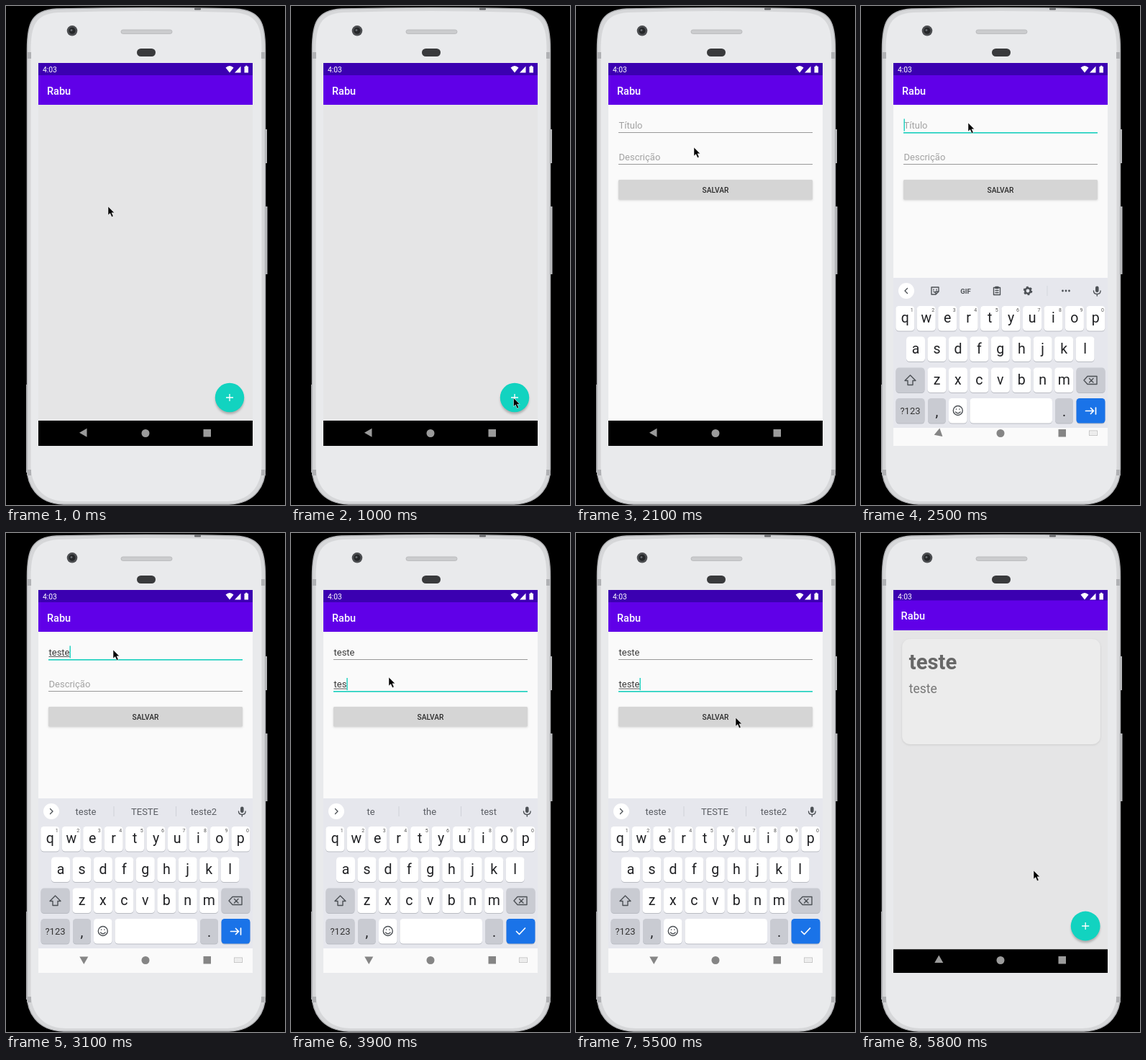
Recreate the animation shown at these times as an HTML page. Size 388 by 692 pixels, loop 5.9 s.

```html
<!DOCTYPE html>
<html lang="pt">
<head>
<meta charset="utf-8">
<title>Notas</title>
<style>
html, body { margin: 0; width: 100%; height: 100%; overflow: hidden; background: #000; }
svg { display: block; width: 388px; height: 692px; }
text { font-family: Roboto, "Liberation Sans", sans-serif; }
.mid { text-anchor: middle; }
.bar { font-size: 14.5px; font-weight: 500; fill: #fff; }
.field { font-size: 13px; fill: #3a3a3a; }
.hint { font-size: 13px; fill: #a2a2a2; }
.key { font-size: 19.5px; fill: #202124; text-anchor: middle; }
.line { fill: none; stroke: #4d5156; stroke-width: 1.4; stroke-linejoin: round; stroke-linecap: round; }
</style>
</head>
<body>
<svg viewBox="0 0 388 692">
  <defs>
    <filter id="soft" x="-30%" y="-30%" width="160%" height="160%"><feGaussianBlur stdDeviation="1.8"/></filter>
    <clipPath id="glass"><rect x="45" y="79" width="298" height="531"/></clipPath>
  </defs>
  <rect width="388" height="692"/>

  <!-- phone -->
  <path d="M361 171h2v47h-2zM361 278h2.500v94h-2.500z" fill="#b9babd"/>
  <path d="M28 525h3v122h-3z" fill="#b4b5b8"/>
  <path d="M29.500 60C29.500 23 36 6 70 4Q195 1 319 4C354 6 360.500 23 360.500 60V642C360.500 662 349 690 310 691H80C41 690 29.500 662 29.500 642Z"
    fill="#d6d7d9" stroke="#b3b4b7" stroke-width="1.500"/>
  <path d="M34.500 62C34.500 27 41 11 72 9Q195 5 317 9C349 11 355.500 27 355.500 62V638C355.500 658 345 686 308 687H82C45 686 34.500 658 34.500 638Z"
    fill="#e9eaec"/>
  <path d="M29 64h6v9h-6zM355 64h6v9h-6zM29 643h6v8h-6zM355 643h6v8h-6z" fill="#b0b1b4"/>
  <rect x="262" y="2.500" width="9" height="3" rx="1" fill="#66676a"/>
  <circle cx="92" cy="34.300" r="7.300" fill="#4c4e51"/>
  <circle cx="92" cy="34.300" r="4.500" fill="#252729"/>
  <circle cx="91" cy="33.500" r="1.500" fill="#64686d"/>
  <rect x="160" y="33" width="71" height="5.500" rx="2.700" fill="#cbccce" stroke="#b0b1b3" stroke-width=".7"/>
  <rect x="182" y="59" width="26" height="11" rx="5.500" fill="#393a3c"/>

  <g clip-path="url(#glass)">
    <rect x="45" y="79" width="298" height="531"/>
    <g id="list">
      <rect x="45" y="79" width="298" height="500" fill="#e5e5e6"/>
      <g id="card">
        <rect x="58.500" y="150" width="273" height="144.500" rx="11" fill="#bbb" opacity=".6" filter="url(#soft)"/>
        <rect x="58.500" y="149" width="273" height="144.500" rx="11" fill="#ececec"/>
        <text x="68" y="190.500" font-size="29" font-weight="700" fill="#686868">teste</text>
        <text x="68" y="223" font-size="17.400" fill="#777">teste</text>
      </g>
      <circle cx="311" cy="546" r="20" fill="#777" opacity=".5" filter="url(#soft)"/>
      <circle cx="311" cy="543" r="20.200" fill="#12d3c0"/>
      <path d="M306 543h10M311 538v10" stroke="#fff" stroke-width="1.300"/>
    </g>
    <g id="form">
      <rect x="43.500" y="137" width="301" height="438" fill="#999"/>
      <rect x="45" y="79" width="298" height="500" fill="#fafafa"/>
      <text id="hint0" class="hint" x="59.500" y="169.500">Título</text>
      <text id="hint1" class="hint" x="59.500" y="214">Descrição</text>
      <text id="text0" class="field" x="59.500" y="169.500"></text>
      <text id="text1" class="field" x="59.500" y="214"></text>
      <rect id="rule0" x="59" y="175" width="270"/>
      <rect id="rule1" x="59" y="219" width="270"/>
      <rect id="compose" x="59.500" height="1" fill="#555"/>
      <rect id="caret" width="1.400" height="17" fill="#18cfbd"/>
      <rect x="59" y="242" width="270" height="27.500" rx="1.500" fill="#999" opacity=".4" filter="url(#soft)"/>
      <rect x="59" y="241" width="270" height="27.500" rx="1.500" fill="#d5d5d5"/>
      <text class="mid" x="194" y="258.600" font-size="10.200" font-weight="500" fill="#2d2d2d">SALVAR</text>
    </g>
    <rect id="lightNav" x="45" y="576" width="298" height="34" fill="#fafafa"/>
    <g id="board"></g>

    <!-- system icons -->
    <text x="51" y="92" font-size="10.300" fill="#fff">4:03</text>
    <path d="M305.500 85.500Q311 80.500 316.500 85.500L311 92.500ZM318 92.500h8.500v-9zM331.500 84h1.500v-1.200h2.500V84h1.500v8.500h-5.500z" fill="#fff"/>
    <g id="nav">
      <path id="back" d="M-6.300 0L4.200 -6V6Z"/>
      <circle cx="194" cy="592.500" r="5.500"/>
      <rect x="274.500" y="587" width="10.500" height="10.500"/>
    </g>
    <g id="switcher" fill="none" stroke="#c4c4c4">
      <rect x="317.500" y="589" width="11" height="6.500"/>
      <path d="M319 591.200h8M319 593.400h8" stroke-dasharray="1.200 1"/>
    </g>
  </g>

  <path id="pointer" d="M0 0V12L2.800 9.500L5 14.500L7.200 13.500L5 8.800H8.700Z" stroke="#fff" stroke-opacity=".75" stroke-width=".7"/>
</svg>
<script>
const $ = id => document.getElementById(id);
const set = (id, attrs) => { for (const k in attrs) $(id).setAttribute(k, attrs[k]); };
const show = (id, on) => { $(id).style.display = on ? '' : 'none'; };

// App bars shared by both screens; the status strip reaches past the glass
const chrome = `<rect x="45" y="60" width="298" height="36.500" fill="#3b00b1"/>
  <rect x="45" y="96" width="298" height="41" fill="#6000e8"/>
  <text class="bar" x="57" y="122.500">Rabu</text>
  <rect x="45" y="575" width="298" height="36"/>`;
$('list').insertAdjacentHTML('beforeend', chrome);
$('form').insertAdjacentHTML('beforeend', chrome);

const key = (x, y, w, fill = '#fff') =>
  `<rect x="${x}" y="${y + 1}" width="${w}" height="34.500" rx="4.500" fill="#b9bcc3"/>
   <rect x="${x}" y="${y}" width="${w}" height="34.500" rx="4.500" fill="${fill}"/>`;
const letters = (row, x, y, digits) => [...row].map((c, i) => {
  const cx = x + i * 29.45;
  const digit = digits ? `<text class="mid" x="${cx + 9.5}" y="415" font-size="7" fill="#555">${(i + 1) % 10}</text>` : '';
  return key(cx - 13, y, 26) + `<text class="key" x="${cx}" y="${y + 23}">${c}</text>` + digit;
}).join('');
const icon = d => `<path class="line" d="${d}"/>`;
const gray = '#c9cbd2';

$('board').innerHTML = `
  <rect x="45" y="368" width="298" height="208" fill="#e6e7ed"/>
  <circle cx="63" cy="386" r="11" fill="#fff"/>
  <path id="chevron" class="line"/>
  <g id="tools">
    ${icon('M98 381h10v6l-4 4h-6zM108 387h-4v4M101 384v1M105 384v1M101 387q2 2 3 0')}
    <text class="mid" x="145.500" y="389.600" font-size="9.500" font-weight="700" fill="#4d5156">GIF</text>
    ${icon('M184.500 381.500h9v10h-9zM187 380.500h4v2h-4zM187 385.500h4M187 388.500h4')}
    <circle cx="232" cy="386" r="3.700" fill="none" stroke="#4d5156" stroke-width="2.600"/>
    <circle cx="232" cy="386" r="5.300" fill="none" stroke="#4d5156" stroke-width="2" stroke-dasharray="2.800 2.750"/>
    <path d="M259 379v14" stroke="#d5d7dd"/>
    ${[280.5, 285, 289.5].map(x => `<circle cx="${x}" cy="386" r="1.400" fill="#4d5156"/>`).join('')}
  </g>
  <g id="words" font-size="13" fill="#5a5d63">
    ${[111, 193, 275].map((x, i) => `<text id="word${i}" class="mid" x="${x}" y="390.500"></text>`).join('')}
    <path d="M150 379v14M236.500 379v14" stroke="#cfd1d8"/>
  </g>
  <rect x="326" y="379.500" width="4.600" height="8.500" rx="2.300" fill="#4d5156"/>
  ${icon('M323.500 386q0 4.500 4.800 4.500t4.800 -4.500M328.300 390.500v2.500')}
  ${letters('qwertyuiop', 61.3, 407, true)}
  ${letters('asdfghjkl', 76, 449.500)}
  ${letters('zxcvbnm', 105.5, 492.500)}
  ${key(48.5, 492.5, 40, gray)}${key(299.5, 492.5, 40, gray)}
  ${icon('M68.500 503l-7.500 7.500h4v6h7v-6h4z')}
  ${icon('M315 504.500h13v11h-13l-5 -5.500zM317.500 507.500l5.500 5.500M323 507.500l-5.500 5.500')}
  ${key(48.5, 535, 40, gray)}${key(93, 535, 25, gray)}${key(122, 535, 25.5)}
  ${key(151.5, 535, 114.5)}${key(270, 535, 25, gray)}${key(299.5, 535, 40, '#1a73e8')}
  <text class="mid" x="68.500" y="557" font-size="13" fill="#333">?123</text>
  <text class="key" x="105.500" y="560">,</text><text class="key" x="282.500" y="560">.</text>
  <circle class="line" cx="134.800" cy="552" r="6.500"/>
  ${icon('M132.500 550v.3M137 550v.3M131.500 554q3.300 3.500 6.600 0')}
  <path id="enter" class="line" style="stroke:#fff;stroke-width:1.700"/>`;

// Keys are [time, value...], interpolated linearly
function at(keys, t) {
  const i = keys.findIndex(k => k[0] > t);
  if (i === 0) return keys[0].slice(1);
  if (i < 0) return keys[keys.length - 1].slice(1);
  const a = keys[i - 1], b = keys[i], p = (t - a[0]) / (b[0] - a[0]);
  return a.slice(1).map((v, j) => v + (b[j + 1] - v) * p);
}

const pointer = [[400, 142, 278], [500, 147, 283], [600, 186, 337], [700, 232, 413], [800, 276, 492],
  [900, 304, 534], [1000, 309.5, 543.5], [1700, 309.5, 543.5], [1900, 252, 410], [2100, 164, 196],
  [2200, 149, 162], [3100, 149, 162], [3400, 136, 200], [4200, 136, 200], [4400, 240, 400],
  [4600, 323, 564], [4800, 323, 564], [5000, 272, 400], [5200, 222, 256], [5500, 222, 256], [5800, 240, 468]];
const listScale = [[1200, 1], [1300, 1.03], [1400, 1.05], [5400, 1.05], [5500, 1.1], [5600, 1.07], [5700, 1.03], [5800, 1.01]];
const formView = [[1200, .85, 0], [1300, .93, .6], [1400, .983, 1], [1500, 1, 1],
  [5500, 1, 1], [5600, .96, .5], [5700, .92, 0]];
const boardDrop = [[2300, 208], [2400, 90], [2500, 9], [2600, 0], [5500, 0], [5600, 90], [5700, 208]];
const backTurn = [[2300, 0], [2400, 30], [2500, 100], [2600, 240], [2700, 270], [5500, 270], [5700, 180], [5800, 90]];
const typed = [[[2600, 0], [3100, 5]], [[3600, 0], [3900, 3], [4000, 3], [4200, 5]]];

const zoom = s => `translate(194 345) scale(${s}) translate(-194 -345)`;

function draw(t) {
  const [x, y] = at(pointer, t);
  set('pointer', { transform: `translate(${x} ${y})` });

  set('list', { transform: zoom(at(listScale, t)[0]) });
  show('card', t >= 5400);
  const [scale, alpha] = at(formView, t);
  set('form', { transform: zoom(scale), opacity: alpha });

  const focus = t < 2300 ? -1 : t < 3600 ? 0 : 1;
  const counts = typed.map(keys => Math.floor(at(keys, t)[0] + .01));
  counts.forEach((n, i) => {
    $('text' + i).textContent = 'teste'.slice(0, n);
    show('hint' + i, !n);
    const on = i === focus;
    set('rule' + i, { height: on ? 1.6 : 1, fill: on ? '#18cfbd' : '#999' });
  });

  show('caret', focus >= 0);
  show('compose', focus >= 0);
  if (focus >= 0) {
    const n = counts[focus], top = focus ? 201 : 156.5;
    const width = n ? $('text' + focus).getComputedTextLength() : 0;
    set('caret', { x: 59.5 + width, y: top });
    set('compose', { width, y: top + 14.5 });
    show('tools', !n);
    show('words', n);
    set('chevron', { d: n ? 'M61.500 382.500l3.500 3.500l-3.500 3.500' : 'M64.500 382.500l-3.500 3.500l3.500 3.500' });
    set('enter', { d: focus ? 'M313.500 552.500l4 4l8 -8.500' : 'M312.500 552.500h11M319.500 548.500l4 4l-4 4M326.500 548v9' });
    const words = n < 5 ? ['te', 'the', 'test'] : ['teste', 'TESTE', 'teste2'];
    words.forEach((w, i) => { $('word' + i).textContent = w; });
  }

  const drop = at(boardDrop, t)[0], open = drop < 208;
  show('board', open);
  show('lightNav', open);
  show('switcher', open);
  set('board', { transform: `translate(0 ${drop})` });
  set('nav', { fill: open ? '#858585' : '#9b9b9b' });
  set('back', { transform: `translate(108.3 591.7) rotate(${at(backTurn, t)[0]})` });
}

function tick() {
  draw(Math.floor(performance.now() % 5900 / 100) * 100);
  requestAnimationFrame(tick);
}
tick();
</script>
</body>
</html>
```
